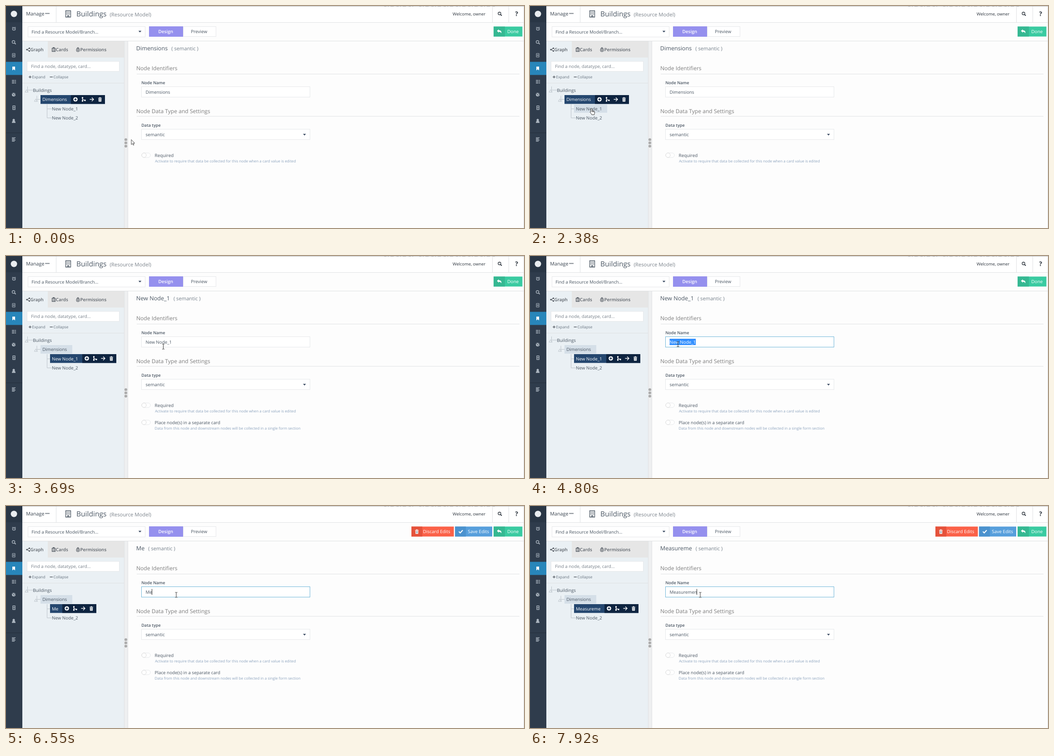
Animation, 1141 px wide and 491 px high, one loop 8 s. Source, as an HTML page:

```html
<!DOCTYPE html>
<html lang="en">
<head>
<meta charset="utf-8">
<title>Graph designer</title>
<style>
  html, body { margin: 0; width: 100%; height: 100%; overflow: hidden; background: #fdfdfd; }
  svg { display: block; width: 1141px; height: 491px; font: 9.8px "Open Sans", sans-serif; text-rendering: geometricPrecision; }
  text { fill: #4a5663; white-space: pre; }
  .semi { font-weight: 600; }
  .white { fill: #fff; }
  .btn { font-size: 10px; fill: #fff; }
  .tab { font-size: 9.9px; font-weight: 600; fill: #5a6068; }
  .section { font-size: 12.1px; fill: #7d7d7d; }
  .label { font-size: 9.1px; font-weight: 600; }
  .hint { font-size: 8.18px; fill: #8ba2bd; }
  .tiny { font-size: 8.4px; fill: #66727e; }
  .box { fill: #fff; stroke: #e6e8ea; }
  .line { fill: none; stroke: #dfe1e3; }
  .tree { fill: none; stroke: #bcc3ca; }
  .hover { fill: #d5dfe8; }
  .ico { fill: none; stroke: currentColor; stroke-width: 1.3; }
  .fill { fill: currentColor; }
</style>
</head>
<body>
<svg viewBox="0 0 1141 491">
  <defs>
    <path id="caret" d="M-3.3-1.8h6.6L0 2z" fill="#3d4c63"/>
    <g id="search" class="ico"><circle cx="-1" cy="-1" r="3"/><path d="M1.2 1.2 4 4" stroke-width="1.8"/></g>
    <g id="building" class="ico"><path d="M-3-4h6v8h-6zM-1-2v4M1-2v4" stroke-width="1"/></g>
    <g id="trash"><path class="fill" d="M-4-3.6h2.3l.7-1.2h2l.7 1.2H4v1.2h-8zM-3.3-1.7h6.6L3 5h-6z"/><path d="M-1.2-.6v4.2M1.2-.6v4.2" stroke="#0e2440" stroke-width=".7"/></g>
    <g id="toggle"><rect x=".5" y=".5" width="19" height="10" rx="5" class="box"/><circle cx="5.5" cy="5.5" r="5" fill="#fff" stroke="#dadada"/></g>
    <path id="fork" d="M3.5-7v12M-2 5.5 1 0l4 5.5zM3.5 1h12" class="tree" fill="#f5f7f8"/>
    <path id="reply" fill="#fff" d="M-5.5-1-1.5-4.5v2.2C3-2.3 5 0 4 4.5 3 2 1.5 1-1.5 1v2.2z"/>
  </defs>

  <!-- page areas -->
  <rect width="1141" height="491" fill="#fdfdfd"/>
  <rect x="36" width="1105" height="36" fill="#fff"/>
  <path class="line" d="M36 36.5h1105M36 77.5h1105M110.5 1v35M1071.5 1v35M1107.5 1v35M1140.5 0v491"/>
  <path d="M0 .5h1141" stroke="#b4b7ba"/>
  <path d="M833 .5h68M910 .5h170" stroke="#85888b" stroke-dasharray="5 3 2 4 7 6"/>

  <!-- side bar -->
  <rect width="36" height="491" fill="#2f3c4c"/>
  <rect width="36" height="36" fill="#293645"/>
  <circle cx="17.5" cy="17.5" r="7" fill="#e9edf0"/>
  <rect y="123.5" width="36" height="29" fill="#2886ba"/>
  <path d="M0 280.5h36" stroke="#242f3c"/>
  <g color="#aeb8c2">
    <g class="ico" transform="translate(17.5 50.5)"><circle r="3.2"/><path d="M0-1.7V.3h1.5M-4-3l1.5-1.2M4-3 2.5-4.2" stroke-width="1"/></g>
    <use href="#search" x="17.5" y="80.5"/>
    <use href="#building" x="17" y="109"/>
    <path d="M14 134h6v8.5l-3-2.5-3 2.5z" fill="#fff"/>
    <path class="ico" stroke-width="2" d="M13 164.5h9M13 167.5h9M13 170.5h9" stroke-dasharray="5.5 1"/>
    <circle class="fill" cx="17" cy="196" r="4"/><path d="M14 194q3 0 3 3l2 1M18 192.5l1 2 2 1" fill="none" stroke="#2f3c4c"/>
    <path class="ico" d="M15 221h5v8h-5zM15 225h5" stroke-width="1.1"/>
    <path class="fill" d="M13 258.5q0-4 2.5-4.2a2.5 2.5 0 1 1 3 0q2.5.2 2.5 4.2z"/>
    <path class="ico" d="M13 291.5h8M13 294h6M13 296.5h8M13 299h6"/>
  </g>

  <!-- header -->
  <text x="44.2" y="21" font-size="10.8" style="fill:#37424d">Manage</text>
  <path d="M87 16.5h9" stroke="#37424d" stroke-width="2" stroke-dasharray="2 1.2"/>
  <g class="ico" color="#46525e" stroke-width="1"><path d="M131.5 10.5h11v14h-11zM135.5 24.5v-3h3v3"/><path d="M133.5 13.5h8M133.5 16h8M133.5 18.5h8" stroke-dasharray="1.5 1.3"/></g>
  <text x="154.9" y="23" font-size="15.6">Buildings</text>
  <text x="228.5" y="23" font-size="11.3" style="fill:#7b838b">(Resource Model)</text>
  <text x="983.8" y="21" font-size="9.35" style="fill:#2c343d">Welcome, owner</text>
  <use href="#search" x="1088" y="17.5" color="#2c343d"/>
  <text x="1121.5" y="22" font-size="13.5" font-weight="700" style="fill:#2c343d">?</text>

  <!-- tool bar -->
  <rect class="box" x="48.5" y="45.5" width="258" height="23"/>
  <text x="56.2" y="60.5">Find a Resource Model/Branch...</text>
  <use href="#caret" x="295" y="56.5"/>
  <rect class="box" x="390.5" y="45.5" width="72" height="22"/>
  <rect x="315" y="45" width="75" height="23" fill="#9590ee"/>
  <text class="semi white" x="335.5" y="59.5" font-size="10">Design</text>
  <text x="407.2" y="59.5" font-size="10">Preview</text>
  <g id="edits">
    <rect x="893" y="45.5" width="93.5" height="22" fill="#fb6148"/><rect x="893" y="45.5" width="24" height="22" fill="#e5523b"/>
    <use href="#trash" x="905" y="56.5" color="#fff"/>
    <text class="btn" x="918.4" y="60">Discard Edits</text>
    <rect x="989" y="45.5" width="82" height="22" fill="#579fdc"/><rect x="989" y="45.5" width="24" height="22" fill="#4b92ce"/>
    <path d="M997.5 56.5l3 3 5.5-6" fill="none" stroke="#fff" stroke-width="2"/>
    <text class="btn" x="1017.3" y="60">Save Edits</text>
  </g>
  <rect x="1074" y="45.5" width="63.5" height="22" fill="#3acba1"/><rect x="1074" y="45.5" width="25" height="22" fill="#35b892"/>
  <use href="#reply" x="1087" y="56"/>
  <text class="btn" x="1104.3" y="60">Done</text>

  <!-- tree panel -->
  <rect x="36" y="78" width="225" height="413" fill="#eaf0f4"/>
  <rect x="92" y="78" width="169" height="36" fill="#e6e6e6"/>
  <rect x="261" y="78" width="7" height="413" fill="#eeeff0"/>
  <path class="line" d="M260.5 78v413M268.5 78v413M36 170.5h225"/>
  <g fill="#aaa"><circle cx="264" cy="295.5" r="3"/><circle cx="264" cy="302.8" r="3"/><circle cx="264" cy="310" r="3"/></g>
  <g color="#5a6068">
    <path class="ico" d="M51.5 93.5 46 96.5l5.5 3"/><path class="fill" d="M50 92h3v3h-3zM44.5 95h3v3h-3zM50 98h3v3h-3z"/>
    <path class="ico" stroke-width="1" d="M101.5 93.5h7v7h-7zM103 92h4M103 96h1M105 96h2M103 98.5h1M105 98.5h2"/>
    <circle class="ico" cx="158.5" cy="97.5" r="3.3"/><path class="ico" d="M156.5 95v-1.5q2-3 4 0V95"/><circle class="fill" cx="158.5" cy="97.5" r="1.5"/>
    <path class="ico" d="M50 157h6M53 154v6M96.5 157h6.5"/>
  </g>
  <text class="tab" x="53.5" y="100">Graph</text>
  <text class="tab" x="109.7" y="100">Cards</text>
  <text class="tab" x="163.5" y="100">Permissions</text>
  <rect class="box" x="46.5" y="122.5" width="203" height="22"/>
  <text x="55.2" y="137.3" style="fill:#77808a">Find a node, datatype, card...</text>
  <text class="tiny" x="57.5" y="160">Expand</text>
  <text class="tiny" x="104.5" y="160">Collapse</text>
  <use href="#fork" x="44" y="185"/><use href="#fork" x="64.5" y="205.5"/>
  <path class="tree" d="M90.5 217v30.5H101M90.5 227.5H101"/>
  <rect id="parentHover" class="hover" x="76" y="197" width="70" height="19"/>
  <rect id="childHover" class="hover" x="97" y="218" width="73" height="18"/>
  <rect id="bar" height="19.5" fill="#25476f"/>
  <g id="actions">
    <rect x="-10" y="-9.5" width="75" height="19.5" fill="#0e2440"/>
    <g color="#fff">
      <circle class="fill" r="4.8"/><path d="M-2.8 0h5.6M0-2.8v5.6" stroke="#0e2440" stroke-width="1.5"/>
      <path class="ico" d="M15.5-4v8M15.5 0l5 2.2" stroke-width="1.1"/><path class="fill" d="M14-5h3v3h-3zM14 2h3v3h-3zM19.5.8h3v3h-3z"/>
      <path class="ico" d="M31.5 0h8M36-4l4 4-4 4" stroke-width="1.8"/>
      <use href="#trash" x="54" y="0"/>
    </g>
  </g>
  <text x="59.2" y="189.5">Buildings</text>
  <text id="parent" x="80.2" y="210">Dimensions</text>
  <text id="child" x="101" y="230.5"></text>
  <text x="101" y="251">New Node_2</text>

  <!-- node form -->
  <text x="286.8" y="98"><tspan id="title" font-size="12.6"></tspan><tspan dx="8" font-size="11.2" fill="#75808b">( semantic )</tspan></text>
  <text class="section" x="286.9" y="142.3">Node Identifiers</text>
  <text class="section" x="286.9" y="236.5">Node Data Type and Settings</text>
  <path class="line" d="M288 150.5h843M288 244h843"/>
  <text class="label" x="298.2" y="172.5">Node Name</text>
  <rect id="input" class="box" x="298.5" y="178.5" width="371" height="23"/>
  <rect id="selection" y="183" height="14" fill="#3390ff"/>
  <text id="value" x="307.5" y="193.5"></text>
  <path id="typeCaret" d="M.5 183.5v13" stroke="#222"/>
  <text class="label" x="298.2" y="267">Data type</text>
  <rect class="box" x="298.5" y="272.5" width="371" height="23"/>
  <text x="307.6" y="288" font-size="10">semantic</text>
  <use href="#caret" x="657.5" y="284.5"/>
  <use href="#toggle" x="298.5" y="324.5"/>
  <text x="327.6" y="333.5" font-size="9.9">Required</text>
  <text class="hint" x="328.2" y="345.8">Activate to require that data be collected for this node when a card value is edited</text>
  <g id="separate">
    <use href="#toggle" x="298.5" y="362.5"/>
    <text x="327.6" y="371.5">Place node(s) in a separate card</text>
    <text class="hint" x="327.6" y="383.5">Data from this node and downstream nodes will be collected in a single form section</text>
  </g>

  <!-- pointers -->
  <path id="arrow" d="M.5.5v11l2.6-2.4 1.7 3.8 1.7-.8-1.7-3.6h3.2z" fill="#fff" stroke="#333" stroke-width=".9"/>
  <g id="hand" fill="#fff" stroke="#222" stroke-width=".9">
    <path d="M4 .5q1.4 0 1.4 1.4V6l4 .9q1.6.4 1.6 2-.2 3-1 5.6H4.5Q3.6 12 1 9.5C0 8.2 1.3 7.3 2.6 8.5V1.9Q2.6.5 4 .5z"/>
    <path d="M5.4 6v2.5M7.3 6.5v2M9.2 7v1.8" fill="none"/>
  </g>
  <path id="beam" d="M-2.5-5.5h2L0-5 .5-5.5h2M0-5V5M-2.5 5.5h2L0 5l.5.5h2" fill="none" stroke="#333"/>
</svg>
<script>
const LOOP = 8000, PICK = 2960, FOCUS = 4530, TYPE = 6280, SAVE = 6410;
const $ = id => document.getElementById(id);
const show = (id, on) => $(id).style.display = on ? '' : 'none';
const set = (id, attrs) => { for (const k in attrs) $(id).setAttribute(k, attrs[k]); };
const at = (steps, t) => steps.findLast(s => s[0] <= t);
const write = (id, s) => { if ($(id).textContent !== s) $(id).textContent = s; };

// time, pointer, x, y
const pointer = [
  [0, 'arrow', 275.5, 295], [140, 'arrow', 286, 296], [260, 'arrow', 298, 297], [380, 'hand', 308, 295],
  [500, 'hand', 312.5, 294], [780, 'hand', 314, 293.5], [930, 'hand', 311.5, 293.5], [1080, 'hand', 309, 293.5],
  [1210, 'arrow', 286, 289], [1330, 'arrow', 246, 270], [1460, 'arrow', 208, 254], [1580, 'arrow', 186, 247],
  [1720, 'arrow', 186, 249], [1840, 'arrow', 185, 245], [1960, 'arrow', 184, 243], [2110, 'arrow', 172, 240],
  [2230, 'hand', 144, 232], [2380, 'hand', 131.5, 226], [3330, 'arrow', 166, 252], [3450, 'arrow', 240, 284],
  [3570, 'hand', 318, 289], [3690, 'beam', 346.5, 200.5], [3840, 'beam', 381.5, 194], [4000, 'beam', 393, 193],
  [4260, 'beam', 379, 190], [4380, 'beam', 368, 189], [4530, 'beam', 330, 191], [4650, 'beam', 282, 192],
  [4800, 'beam', 326, 195], [4920, 'beam', 372, 197], [5080, 'beam', 375, 196.5]
];

// time, letters typed; the saved name follows a little later
const word = 'Measuremen';
const typed = [[6280, 1], [6410, 2], [6830, 3], [6980, 4], [7390, 5], [7540, 6], [7680, 7], [7800, 9], [7920, 10]];
const saved = [[6410, 1], [6550, 2], [6980, 3], [7130, 4], [7540, 5], [7680, 6], [7800, 8], [7920, 9]];
const letters = (steps, t, before) => {
  const step = at(steps, t);
  return step ? word.slice(0, step[1]) : before;
};

function draw(t) {
  const picked = t >= PICK, typing = t >= TYPE;
  const name = letters(saved, t, 'New Node_1');

  write('child', name);
  write('title', picked ? name : 'Dimensions');
  write('value', picked ? letters(typed, t, 'New Node_1') : 'Dimensions');
  show('parentHover', picked);
  show('childHover', t >= 2230 && !picked);
  show('separate', picked);
  show('edits', t >= SAVE);

  // highlighted tree row with its buttons
  const row = picked ? 'child' : 'parent';
  const x = picked ? 97 : 76, y = picked ? 217 : 197;
  const end = Math.round(x + 5 + $(row).getComputedTextLength());
  set('bar', { x, y, width: end + 83 - x });
  set('actions', { transform: `translate(${end + 18} ${y + 9.5})` });
  $('parent').style.fill = picked ? '' : '#fff';
  $('child').style.fill = picked ? '#fff' : '';

  const [, kind, px, py] = at(pointer, t);
  for (const id of ['arrow', 'hand', 'beam']) show(id, id === kind);
  set(kind, { transform: `translate(${px} ${py})` });

  // name field: drag selection, then typing
  const width = $('value').getComputedTextLength();
  const marked = t >= FOCUS && !typing;
  const from = t < 4650 ? Math.max(0, px - 307.5) : 0;
  $('input').style.stroke = t >= FOCUS ? '#6db5d8' : '';
  show('selection', marked);
  set('selection', { x: 307.5 + from, width: Math.max(0, width - from) });
  $('value').style.fill = marked && from === 0 ? '#fff' : '';
  show('typeCaret', typing);
  set('typeCaret', { transform: `translate(${Math.round(307.5 + width) - 1} 0)` });
}

function frame() {
  draw(performance.now() % LOOP);
  requestAnimationFrame(frame);
}
frame();
</script>
</body>
</html>
```
